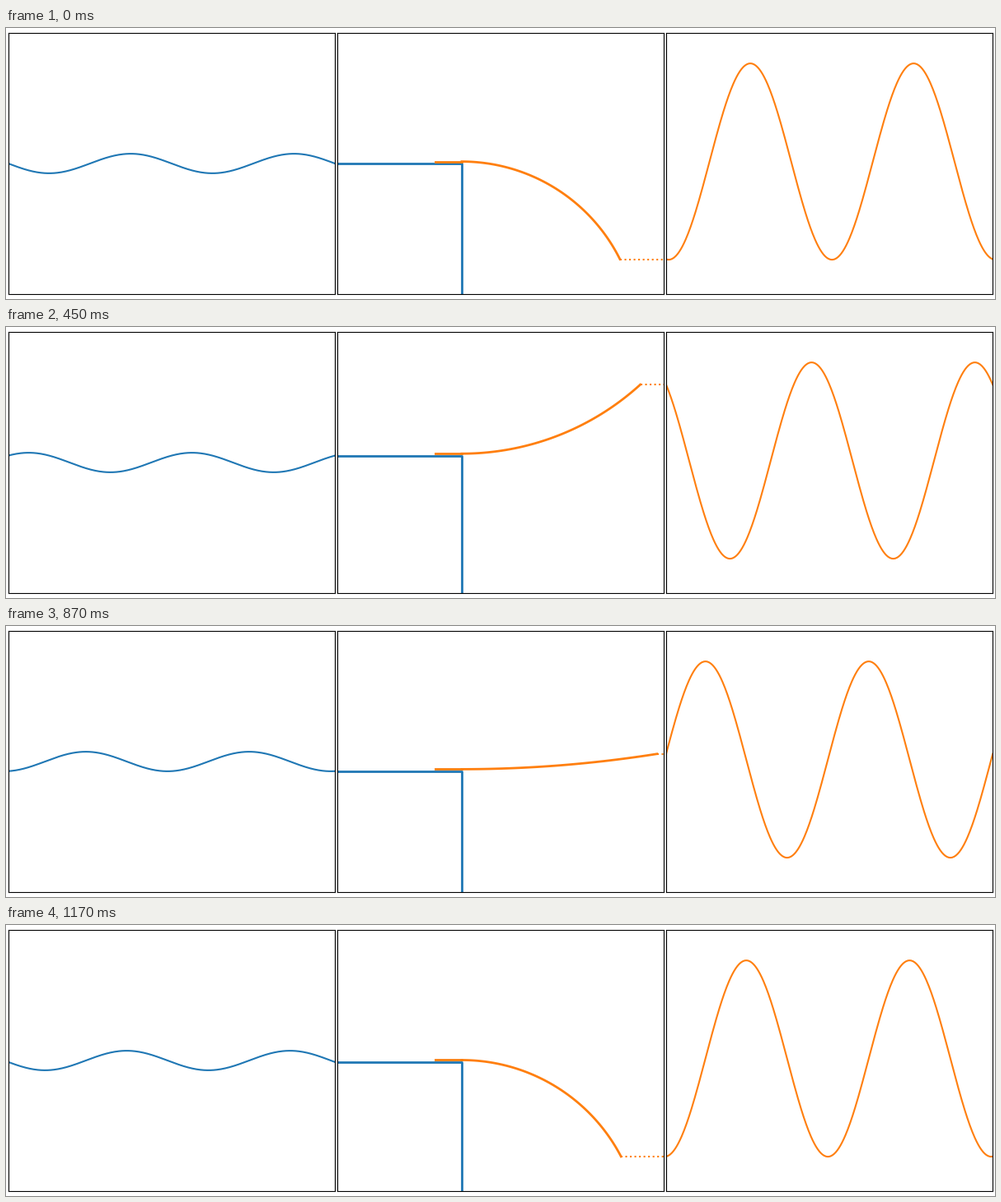
Write a matplotlib script that moves like this. It is 1200 px wide and 330 px high and loops after 1200 ms.

```python
import numpy as np
import matplotlib.pyplot as plt
from matplotlib.animation import FuncAnimation

W, H, DPI = 1200, 330, 100
FRAMES, INTERVAL = 40, 30
PAD = 0.2 * 10 * DPI / 72            # gap around the panels, px
PANEL_W = (W - 4 * PAD) / 3
PANEL_H = 0.8 * PANEL_W

SPAN = 10 / 3                        # panel width in beam units
HALF = 4 / 3                         # half of the panel height
LENGTH = 2.0                         # free length of the beam
CLAMP = 0.27                         # part of the beam on the block
LEFT = -1.271                        # left limit; the block ends at 0
LIFT = 0.02                          # beam sits just above the block
BASE_AMP = 0.1

BLUE, ORANGE = "C0", "C1"


def base(phase):
    """Height of the shaken block."""
    return BASE_AMP * np.sin(phase)


def bend(phase):
    """Tip height relative to the block: resonance, a quarter turn late."""
    return -np.cos(phase)


def tip(phase):
    return LIFT + base(phase) + bend(phase)


ANGLES = np.linspace(-1.3, 1.3, 2601)
BENDS = LENGTH * np.sin(ANGLES / 2) * np.sinc(ANGLES / (2 * np.pi))
ARC = np.linspace(0, LENGTH, 120)


def beam_shape(height):
    """Circular arc of fixed length whose end rises by height."""
    turn = np.interp(height, BENDS, ANGLES) * ARC / LENGTH
    x = ARC * np.sinc(turn / np.pi)
    y = ARC * np.sin(turn / 2) * np.sinc(turn / (2 * np.pi))
    return x, y


fig = plt.figure(figsize=(W / DPI, H / DPI), dpi=DPI, facecolor="white")


def panel(index, x0, x1):
    left = PAD + index * (PANEL_W + PAD)
    bottom = (H - PANEL_H) / 2
    ax = fig.add_axes([left / W, bottom / H, PANEL_W / W, PANEL_H / H])
    ax.set(xlim=(x0, x1), ylim=(-HALF, HALF), xticks=[], yticks=[])
    return ax


RIGHT = LEFT + SPAN
ax_in = panel(0, 0, 4 * np.pi)
ax_beam = panel(1, LEFT, RIGHT)
ax_out = panel(2, 0, 4 * np.pi)

wave_x = np.linspace(0, 4 * np.pi, 400)
wave_in, = ax_in.plot(wave_x, 0 * wave_x, color=BLUE, lw=1.5)
wave_out, = ax_out.plot(wave_x, 0 * wave_x, color=ORANGE, lw=1.5)

block, = ax_beam.plot([], [], color=BLUE, lw=2)
clamp, = ax_beam.plot([], [], color=ORANGE, lw=2)
beam, = ax_beam.plot([], [], color=ORANGE, lw=2)
pointer, = ax_beam.plot([], [], color=ORANGE, lw=1.5, ls=":")


def draw(frame):
    phase = 2 * np.pi * frame / FRAMES
    wave_in.set_ydata(base(phase - wave_x))
    wave_out.set_ydata(tip(phase - wave_x))

    y0 = base(phase)
    block.set_data([LEFT - 0.1, 0, 0], [y0, y0, -HALF - 0.2])
    clamp.set_data([-CLAMP, 0], [y0 + LIFT] * 2)
    x, y = beam_shape(bend(phase))
    y = y + y0 + LIFT
    beam.set_data(x, y)
    pointer.set_data([x[-1], RIGHT], [y[-1], y[-1]])
    return wave_in, wave_out, block, clamp, beam, pointer


anim = FuncAnimation(fig, draw, frames=FRAMES, interval=INTERVAL,
                     repeat=True, repeat_delay=0, blit=False)
plt.show()
```
